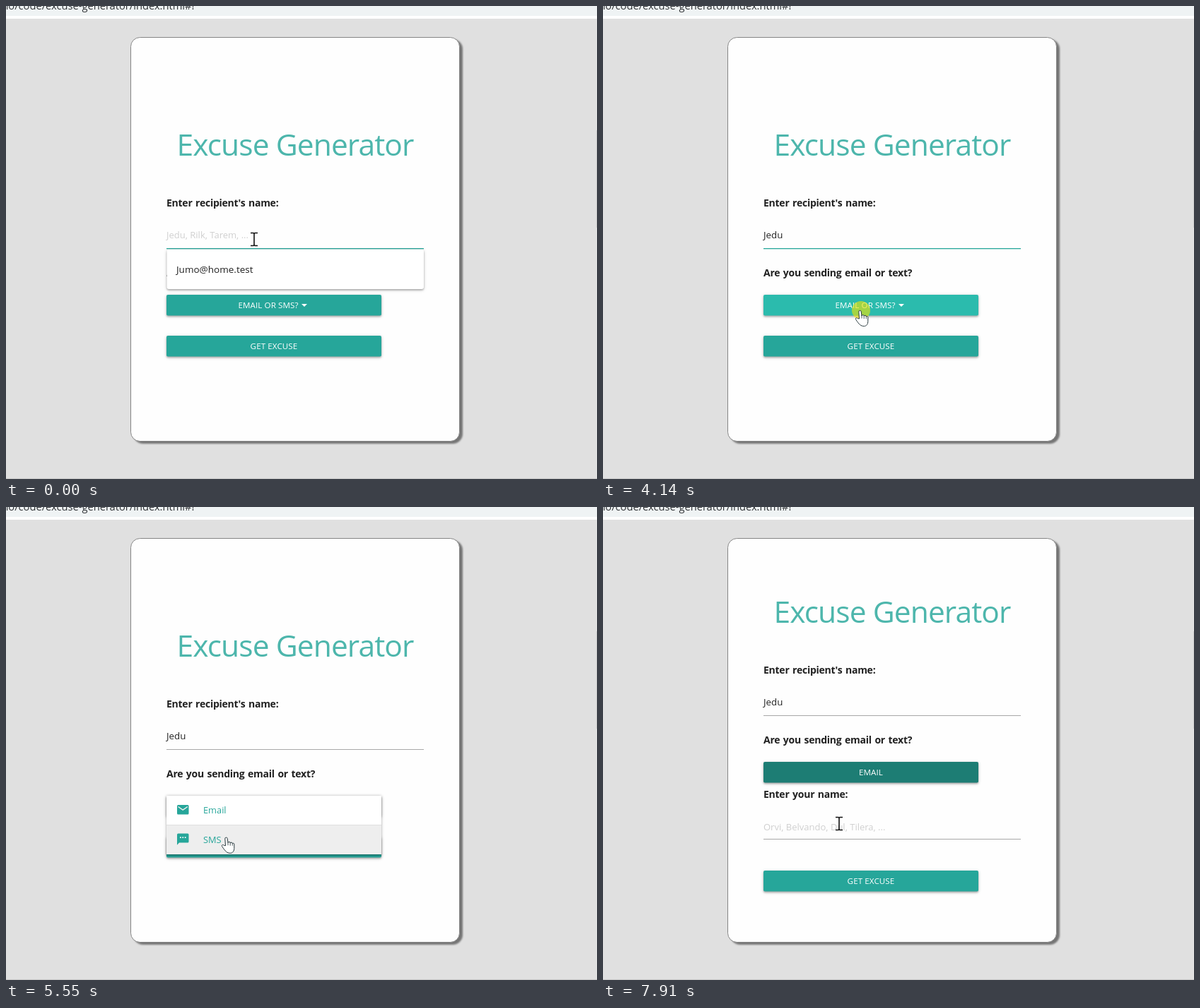
Write an HTML page that moves like this. It is 836 px wide and 670 px high and loops after 8000 ms.

```html
<!DOCTYPE html>
<html lang="en">
<head>
<meta charset="utf-8">
<title>Excuse Generator</title>
<style>
  html, body { margin: 0; width: 100%; height: 100%; overflow: hidden; background: #e0e0e0; }
  svg { display: block; width: 836px; height: 670px; }
  text { font: 13.3px "Open Sans", "Noto Sans", sans-serif; fill: #212121; white-space: pre; }
  filter { color-interpolation-filters: sRGB; }
  .title { font-size: 42.5px; letter-spacing: -.9px; fill: #4db6ac; }
  .label { font-size: 14px; font-weight: 700; letter-spacing: -.25px; word-spacing: 1.2px; }
  .hint { font-size: 13px; fill: #d0d0d0; }
  .caption { font-size: 11.6px; letter-spacing: .1px; fill: #fff; text-anchor: middle; }
  .item { font-size: 12.8px; fill: #26a69a; }
  .suggestion { font-size: 13.5px; font-weight: 500; }
  .address { font-size: 14.7px; fill: #303336; text-anchor: end; }
  .button { fill: #26a69a; filter: url(#raised); }
  .teal { fill: #26a69a; }
</style>
</head>
<body>
<svg viewBox="0 0 836 670">
  <defs>
    <filter id="raised" x="-5%" y="-30%" width="110%" height="170%">
      <feDropShadow dx="0" dy="1.6" stdDeviation=".8" flood-opacity=".24"/>
      <feDropShadow dx="0" dy=".8" stdDeviation="2" flood-opacity=".2"/>
    </filter>
    <filter id="cardShadow" x="-5%" y="-5%" width="110%" height="110%">
      <feDropShadow dx="4" dy="3" stdDeviation="1.3" flood-color="#757575"/>
    </filter>
  </defs>

  <rect width="836" height="670" fill="#e0e0e0"/>
  <rect width="836" height="18" fill="#fff"/>
  <rect width="836" height="14" fill="#eff3f4"/>
  <text class="address" x="266.500" y="4.500">mo/code/excuse-generator/index.html#!</text>
  <rect x="835" y="18" width="1" height="652" fill="#e6e6e6"/>
  <rect x="835" y="176" width="1" height="138" fill="#cfcfcf"/>
  <rect y="669" width="836" height="1" fill="#c6c6c6"/>
  <rect x="176.500" y="44.500" width="465" height="572" rx="13" fill="#fefefe" stroke="#858585" filter="url(#cardShadow)"/>

  <g id="form">
    <text class="title" x="241.500" y="212">Excuse Generator</text>
    <text class="label" x="227" y="284">Enter recipient's name:</text>
    <text class="hint" id="hint" x="227" y="329">Jedu, Rilk, Tarem, ...</text>
    <text id="typed" x="227" y="329"></text>
    <rect id="caret" y="316" width="1.3" height="17" fill="#000"/>
    <rect id="line" x="227" y="343" width="364" height="1"/>
    <text class="label" x="227" y="383">Are you sending email or text?</text>
    <rect class="button" id="choice" x="227" y="409" width="304" height="29.500" rx="2"/>
    <text class="caption" id="choiceText" y="428.300"></text>
    <path id="arrow" d="M418 422h8l-4 4z" fill="#fff"/>
  </g>

  <g id="sender">
    <text class="label" x="227" y="411.500">Enter your name:</text>
    <text class="hint" x="227" y="457.500">Orvi, Belvando, Dul, Tilera, ...</text>
    <rect x="227" y="470" width="364" height="1" fill="#a8a8a8"/>
  </g>

  <g id="submit">
    <rect class="button" x="227" y="467" width="304" height="29.500" rx="2"/>
    <text class="caption" x="379" y="486">GET EXCUSE</text>
  </g>

  <g id="menu">
    <rect x="227" y="409" width="304" height="83" fill="#fff" filter="url(#raised)"/>
    <rect id="emailRow" x="227" y="409" width="304" height="41.500"/>
    <rect id="smsRow" x="227" y="450.500" width="304" height="41.500"/>
    <rect x="227" y="450" width="304" height="1" fill="#e0e0e0"/>
    <rect class="teal" x="242" y="422" width="16.500" height="13.500" rx="1.500"/>
    <path d="M243.500 424.500l6.700 4.500 6.700-4.500" fill="none" stroke="#eee" stroke-width="1.500"/>
    <text class="item" x="279" y="434">Email</text>
    <path class="teal" d="M243.500 462.500h13.500q1.500 0 1.500 1.500v10q0 1.500-1.500 1.500H245l-3 3.300V464q0-1.500 1.500-1.500z"/>
    <path d="M246 468.200h1.700m1.700 0h1.700m1.700 0h1.700" stroke="#fff" stroke-width="1.700"/>
    <text class="item" x="279" y="476">SMS</text>
  </g>

  <g id="suggest">
    <rect x="227.500" y="345" width="363.500" height="56" rx="3" fill="#fff" filter="url(#raised)"/>
    <text class="suggestion" x="241" y="378">Jumo@home.test</text>
  </g>

  <circle id="click" r="13" fill="#f5e400" fill-opacity=".6"/>
  <path id="beam" fill="none" stroke="#111" stroke-width="1.600"
    d="M-5-8.500h4l1 1 1-1h4M0-7.500V8.500M-5 9.500h4l1-1 1 1h4"/>
  <g id="hand" stroke="#27383d" stroke-linejoin="round">
    <path fill="#fff" d="M-2.500 12L-3.200 2.200a1.700 1.700 0 0 1 3.400-.3L1 8a1.600 1.600 0 0 1 3.200.4a1.600 1.600 0 0 1 3.100.6a1.400 1.400 0 0 1 2.500 1v5.500c0 4-2 7-5.500 7c-4.800 0-7-2.500-11.500-9.200c-1.600-2.500 1.200-3.200 2.700-1.700z"/>
    <path d="M1 8v3.500M4.200 8.400v3.600M7.300 9v3" fill="none" stroke-width=".8"/>
  </g>
</svg>
<script>
const LOOP = 8000;
const el = Object.fromEntries([...document.querySelectorAll('[id]')].map(e => [e.id, e]));

const typing = [[0, ''], [1710, 'J'], [2240, 'Je'], [2520, 'Jed'], [2800, 'Jedu']];
const caretBlink = [[0, 0], [190, 1], [720, 0], [1250, 1], [3330, 0], [3870, 1], [4140, 0]];

const within = (t, from, to) => t >= from && t < to;
const latest = (table, t) => table.filter(([at]) => at <= t).pop()[1];
const mix = (a, b, p) => a + (b - a) * p;
const smooth = p => p * p * (3 - 2 * p);
const easeOut = p => 1 - (1 - p) ** 3;
const same = p => p;
const show = (e, on) => e.setAttribute('visibility', on ? 'visible' : 'hidden');
const shift = (e, x, y) => e.setAttribute('transform', `translate(${x} ${y})`);
const scaleAt = (e, x, y, s) =>
  e.setAttribute('transform', `translate(${x} ${y}) scale(${s}) translate(${-x} ${-y})`);

// Progress in n held steps: the first lands at start, the last at end.
function steps(t, start, end, n) {
  if (t < start) return 0;
  return Math.min(1, (Math.floor((t - start) / (end - start) * (n - 1) + .02) + 1) / n);
}

const moves = [
  { start: 3470, end: 3870, n: 7, to: [365, 431], easeX: smooth, easeY: smooth },
  { start: 5070, end: 5690, n: 10, to: [300, 472], easeX: same, easeY: smooth },
  { start: 6020, end: 6370, n: 6, to: [332, 436.5], easeX: easeOut, easeY: easeOut },
  { start: 7240, end: 7241, n: 1, to: [334, 438], easeX: same, easeY: same },
  { start: 7840, end: 7910, n: 2, to: [334, 448], easeX: same, easeY: same },
];

function pointer(t) {
  let [x, y] = [351, 330];
  for (const m of moves) {
    const p = m.n === 1 ? +(t >= m.start) : steps(t, m.start, m.end, m.n);
    x = mix(x, m.to[0], m.easeX(p));
    y = mix(y, m.to[1], m.easeY(p));
  }
  return [x, y];
}

function blend(a, b, p) {
  return `rgb(${a.map((v, i) => Math.round(mix(v, b[i], p)))})`;
}

function drawField(t) {
  const name = latest(typing, t);
  el.typed.textContent = name;
  show(el.hint, !name);
  show(el.caret, latest(caretBlink, t));
  el.caret.setAttribute('x', 227.3 + (name ? el.typed.getComputedTextLength() : 0));
  const blur = Math.min(1, Math.max(0, (t - 4140) / 330));
  el.line.setAttribute('fill', blend([38, 166, 154], [168, 168, 168], blur));
  el.line.setAttribute('height', mix(1.3, 1, blur));
}

function drawSuggestion(t) {
  const p = steps(t, 2240, 2450, 4);
  el.suggest.setAttribute('opacity', 1 - p ** 1.6);
  scaleAt(el.suggest, 409, 345, 1 - .02 * p);
}

function drawMenu(t, y) {
  const opened = steps(t, 4270, 4410, 3);
  const closed = easeOut(steps(t, 7030, 7240, 4));
  el.menu.setAttribute('opacity', opened * (1 - closed));
  scaleAt(el.menu, 227, 409, mix(.3, 1, opened) - .7 * closed);
  el.emailRow.setAttribute('fill', y < 450 ? '#eee' : '#fff');
  el.smsRow.setAttribute('fill', y < 450 ? '#fff' : '#eee');
}

function drawLayout(t, y) {
  const chosen = t >= 6960;
  shift(el.form, 0, chosen ? -48 : 0);
  shift(el.submit, 0, chosen ? 48 : 0);
  show(el.sender, chosen);
  show(el.arrow, !chosen);
  el.choiceText.textContent = chosen ? 'EMAIL' : 'EMAIL OR SMS?';
  el.choiceText.setAttribute('x', chosen ? 379 : 371);
  const hovered = y > 409 && t < 4410;
  el.choice.style.fill = chosen
    ? blend([38, 166, 154], [29, 125, 116], steps(t, 7030, 7240, 4))
    : hovered ? '#2bbbad' : '#26a69a';
}

function drawPointer(t, x, y) {
  const onButton = y > 409 && t < 7240;
  show(el.hand, onButton);
  show(el.beam, !onButton);
  shift(el.hand, x, y);
  shift(el.beam, x, y);
  shift(el.click, x, y);
  show(el.click, within(t, 4140, 4340) || within(t, 6770, 6960));
}

function render(t) {
  const [x, y] = pointer(t);
  drawField(t);
  drawSuggestion(t);
  drawMenu(t, y);
  drawLayout(t, y);
  drawPointer(t, x, y);
}

const begin = performance.now();
function tick() {
  render((performance.now() - begin) % LOOP);
  requestAnimationFrame(tick);
}
tick();
</script>
</body>
</html>
```
